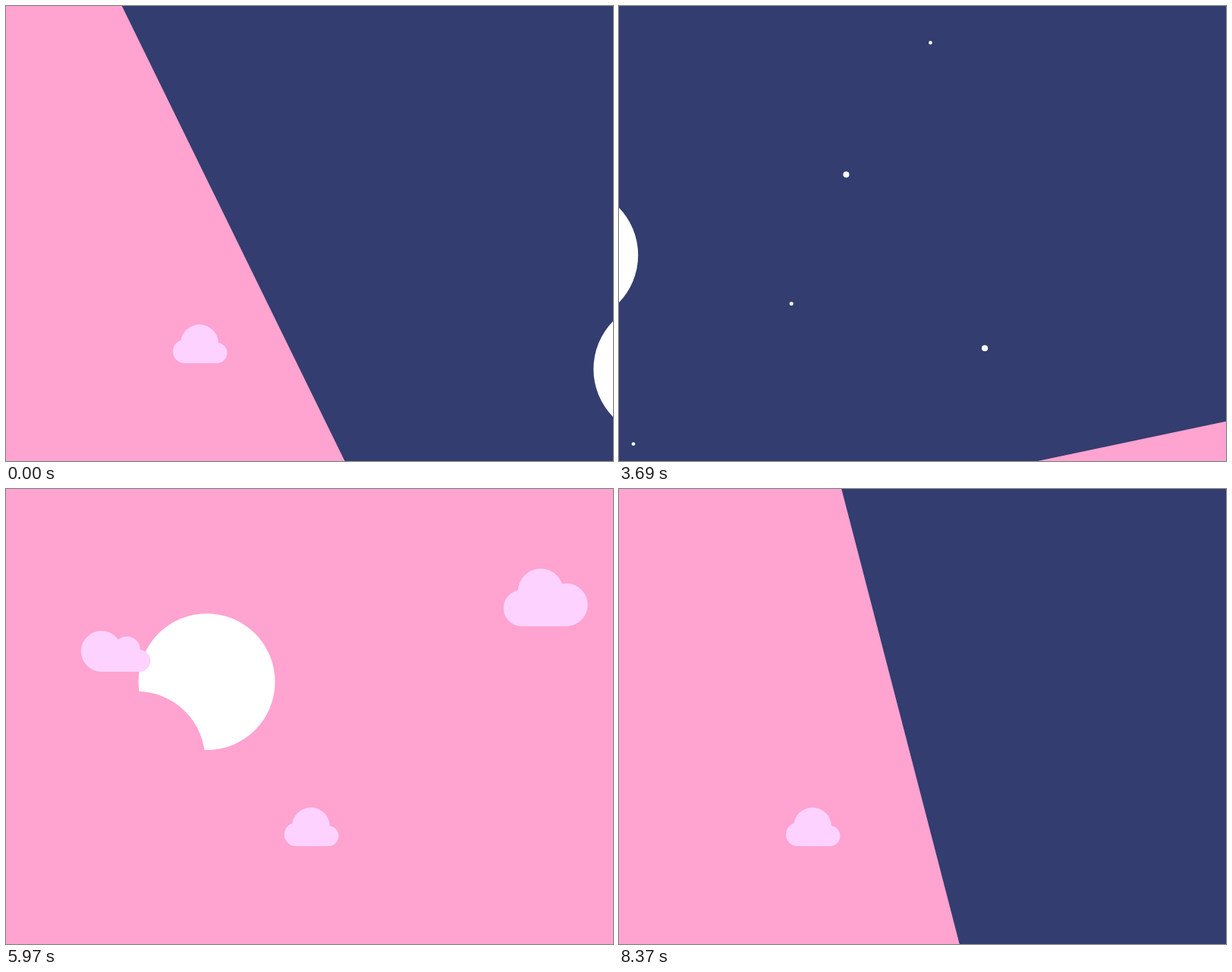
These frames come from a looping animation (800 px wide and 600 px high, 8.4 s). An HTML page with a canvas:

```html
<!DOCTYPE html>
<html lang="en">
<head>
<meta charset="utf-8">
<title>Night and day</title>
<style>
  html, body { margin: 0; width: 100%; height: 100%; overflow: hidden; background: #333d6f; }
  canvas { display: block; width: 800px; height: 600px; }
</style>
</head>
<body>
<canvas id="sky" width="800" height="600"></canvas>
<script>
const ctx = document.getElementById('sky').getContext('2d');
const LOOP = 8400, HALF = LOOP / 2;
const NAVY = '#333d6f', PINK = '#ffa3d0', CLOUD = '#fdd2ff', WHITE = '#fff';
const RAD = Math.PI / 180;

// Once per half loop the outgoing sky swings away around a low pivot
const TURN = { start: 3071, time: 2146, x: 442.4, y: 613.4, edge: -9.5 };
// Moon and sun ride on one wide arc
const ARC = { x: 285, y: 1113, r: 859 };
const DISC = 90;

// Resting place of each star and the offset it arrives from
const stars = [
  { r: 4, x: 629, y: 127, from: [28, -111] },
  { r: 2.5, x: 590, y: 307, from: [92, -29.5] },
  { r: 4.6, x: 537.5, y: 582, from: [-104.5, -46] },
  { r: 2.3, x: 366, y: 548, from: [0, 100] },
  { r: 4.1, x: 968, y: 271, from: [0, 0] },
  { r: 2.3, x: 721, y: -70, from: [0, 0] }
];

// A left and a right puff stand on the floor, a third one sits on top
const clouds = [
  { width: 111, floor: 181, left: 24, right: 28.3, top: [49, 135, 30],
    place: t => 623 + 1.325e-5 * Math.max(t - 4400, 0) ** 2 },
  { width: 91.5, floor: 241, left: 27, right: 14.5, top: [60.5, 212, 17.6],
    place: t => -91 + 0.24 * (t - 5180) },
  { width: 71.5, floor: 471, left: 15.5, right: 13.5, top: [35, 445, 25],
    place: t => 220 + 2.73e-5 * Math.max(8290 - t, 0) ** 2 }
];

// Cubic bezier easing with level ends
function ease(p, x1, x2) {
  let lo = 0, hi = 1;
  for (let i = 0; i < 30; i++) {
    const s = (lo + hi) / 2, r = 1 - s;
    if (3 * r * r * s * x1 + 3 * r * s * s * x2 + s * s * s < p) lo = s; else hi = s;
  }
  return lo * lo * (3 - 2 * lo);
}

function fill(color) {
  ctx.fillStyle = color;
  ctx.fillRect(0, 0, 800, 600);
}

function dot(x, y, r) {
  ctx.beginPath();
  ctx.arc(x, y, r, 0, 2 * Math.PI);
  ctx.fill();
}

function drawStars(t) {
  const time = t < 6000 ? t : t - LOOP;
  const arrive = (Math.max(2130 - time, 0) / 960) ** 2;
  const leave = (Math.max(time - 2130, 0) / 1560) ** 2;
  ctx.fillStyle = WHITE;
  for (const { r, x, y, from } of stars) {
    const exitX = -76 - 0.35 * x - 0.26 * y, exitY = 0.25 * x - 62;
    dot(x + from[0] * arrive + exitX * leave, y + from[1] * arrive + exitY * leave, r);
  }
}

function drawClouds(t) {
  const time = t < 2000 ? t + LOOP : t;
  ctx.fillStyle = CLOUD;
  for (const { width, floor, left, right, top, place } of clouds) {
    const x = place(time), [topX, topY, topR] = top;
    ctx.fillRect(x + left, topY, width - left - right, floor - topY);
    dot(x + left, floor - left, left);
    dot(x + width - right, floor - right, right);
    dot(x + topX, topY, topR);
  }
}

function drawDisc(t) {
  const p = t % HALF, tilt = t < HALF ? -26.9 : 133.3;
  const before = Math.max(1650 - p, 0) / 1650;
  const after = Math.max(p - 1650, 0) / 2040;
  const swing = 1.35 - 40.4 * before ** 7 - 3.53 * before + 22.65 * after ** 2.65;
  const x = ARC.x - ARC.r * Math.sin(swing * RAD);
  const y = ARC.y - ARC.r * Math.cos(swing * RAD);
  // A second circle slides across and cuts out the phase
  const gap = 173 - (0.00382 * Math.max(p - 452, 0)) ** 2.2;
  const dir = (tilt - swing) * RAD;

  ctx.save();
  ctx.beginPath();
  ctx.rect(-400, -400, 1600, 1600);
  ctx.arc(x + gap * Math.cos(dir), y + gap * Math.sin(dir), DISC, 0, 2 * Math.PI);
  ctx.clip('evenodd');
  ctx.fillStyle = WHITE;
  dot(x, y, DISC);
  ctx.restore();
}

function draw(t) {
  const turns = (t - TURN.start) / HALF, count = Math.floor(turns);
  const progress = Math.min((turns - count) * HALF / TURN.time, 1);
  const angle = (-90 - 180 * ease(progress, 0.82, 0.174)) * RAD;
  const toDay = count === 0;

  // Paints only on the outgoing or the incoming side of the edge
  const inside = (outgoing, paint) => {
    ctx.save();
    ctx.translate(TURN.x, TURN.y);
    ctx.rotate(angle);
    ctx.beginPath();
    ctx.rect(outgoing ? TURN.edge : TURN.edge - 4000, -2000, 4000, 4000);
    ctx.clip();
    ctx.resetTransform();
    paint(t);
    ctx.restore();
  };

  fill(toDay ? PINK : NAVY);
  inside(true, () => fill(toDay ? NAVY : PINK));
  inside(toDay, drawStars);
  drawDisc(t);
  inside(!toDay, drawClouds);
}

const begin = performance.now();
function tick() {
  draw((performance.now() - begin) % LOOP);
  requestAnimationFrame(tick);
}
tick();
</script>
</body>
</html>
```
